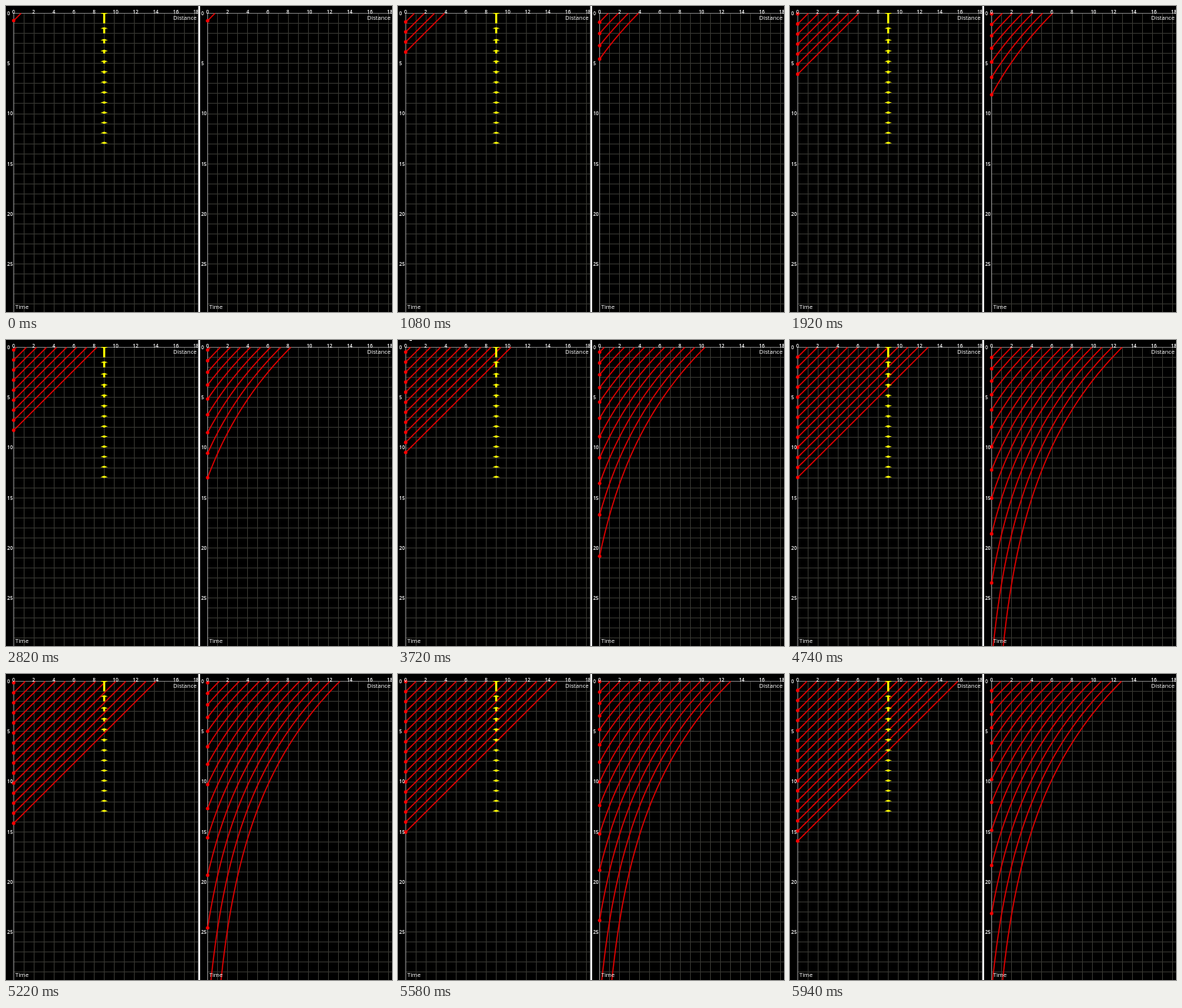
Animation, 501 px wide and 398 px high, one loop 6070 ms. Source, as an HTML page with a canvas:

```html
<!DOCTYPE html>
<html lang="en">
<head>
<meta charset="utf-8">
<title>Distance and time</title>
<style>
html, body { margin: 0; width: 100%; height: 100%; overflow: hidden; background: #000; }
canvas { display: block; }
</style>
</head>
<body>
<canvas id="stage" width="501" height="398"></canvas>
<script>
const ctx = document.getElementById('stage').getContext('2d');
const LOOP = 6070, STEP = 60, LAST = 99;
const UNIT = 13.05, LEFT = 10, TOP = 9.5, PANEL = 251.72, WIDTH = 249.5, HEIGHT = 398;
const HORIZON = 13.2, ARROWS = 13;
const px = x => LEFT + x * UNIT;
const py = y => TOP + y * UNIT;
const straight = t => t;
const stretch = t => -HORIZON * Math.log(1 - t / HORIZON);

function line(x1, y1, x2, y2, color) {
  ctx.strokeStyle = color;
  ctx.beginPath();
  ctx.moveTo(x1, y1);
  ctx.lineTo(x2, y2);
  ctx.stroke();
}

// Grid lines sit on whole stage pixels, whatever the panel's offset.
function grid(offset) {
  ctx.lineWidth = 1;
  for (let i = 1; i <= 18; i++) {
    const x = Math.floor(px(i) + offset) + 0.5 - offset;
    line(x, TOP, x, HEIGHT, '#34342f');
  }
  for (let i = 1; i < 30; i++) {
    const y = Math.floor(py(i)) + 0.5;
    line(LEFT, y, WIDTH, y, '#34342f');
  }
  line(LEFT, TOP, LEFT, HEIGHT, '#999');
  line(LEFT, TOP, WIDTH, TOP, '#777');
}

function labels() {
  ctx.fillStyle = '#fff';
  ctx.font = '600 6.4px "Open Sans", "Noto Sans", sans-serif';
  for (let i = 0; i <= 18; i += 2) ctx.fillText(i, px(i) - 2, 9.8);
  for (let i = 0; i <= 25; i += 5) ctx.fillText(i, 1.5, py(i) + 2.3);
  ctx.font = '500 7.6px "Open Sans", "Noto Sans", sans-serif';
  ctx.fillText('Distance', 217, 18);
  ctx.fillText('Time', 12, 394);
}

// Each upward arrow is 1/n long and ends at time n.
function arrows() {
  const x = px(9);
  ctx.save();
  ctx.beginPath();
  ctx.rect(0, TOP - 0.5, WIDTH, HEIGHT);
  ctx.clip();
  ctx.fillStyle = '#ff0';
  for (let n = 1; n <= ARROWS; n++) {
    const y = py(n - 1 / n);
    ctx.fillRect(x - 1.3, y, 2.6, UNIT / n);
    ctx.beginPath();
    ctx.moveTo(x, y - 1.6);
    ctx.lineTo(x + 4.8, y + 0.2);
    ctx.lineTo(x, y + 1);
    ctx.lineTo(x - 4.8, y + 0.2);
    ctx.fill();
  }
  ctx.restore();
}

function ray(start, warp) {
  ctx.beginPath();
  for (let i = 0; i <= 80; i++) {
    const t = start * i / 80;
    ctx.lineTo(px(start - t), py(warp(t)));
  }
  ctx.stroke();
  ctx.beginPath();
  ctx.arc(LEFT, py(warp(start)), 2.3, 0, 2 * Math.PI);
  ctx.fill();
}

function rays(first, limit, warp) {
  ctx.strokeStyle = '#e60000';
  ctx.fillStyle = '#f00';
  ctx.lineWidth = 1.5;
  for (let s = first; s > 0; s--) if (s < limit) ray(s, warp);
}

function panel(offset, drawContent) {
  ctx.save();
  ctx.translate(offset, 0);
  ctx.beginPath();
  ctx.rect(0, 0, WIDTH, HEIGHT);
  ctx.clip();
  grid(offset);
  drawContent();
  labels();
  ctx.restore();
}

function draw(now) {
  const n = Math.min(LAST, Math.floor(now % LOOP / STEP));
  const first = Math.min(0.73 + 0.174 * n, 1.36 + 0.147 * n);
  ctx.fillStyle = '#000';
  ctx.fillRect(0, 0, 501, HEIGHT);
  panel(0, () => {
    rays(first, Infinity, straight);
    arrows();
  });
  panel(PANEL, () => rays(first, HORIZON, stretch));
  ctx.fillStyle = '#fff';
  ctx.fillRect(249.5, 0, 2.5, HEIGHT);
  // Tip of a pointer passing the top edge.
  if (n >= 60 && n < 75) ctx.fillRect(15 + (n - 62) * 0.5, 0, 3, 1);
  requestAnimationFrame(draw);
}
requestAnimationFrame(draw);
</script>
</body>
</html>
```
